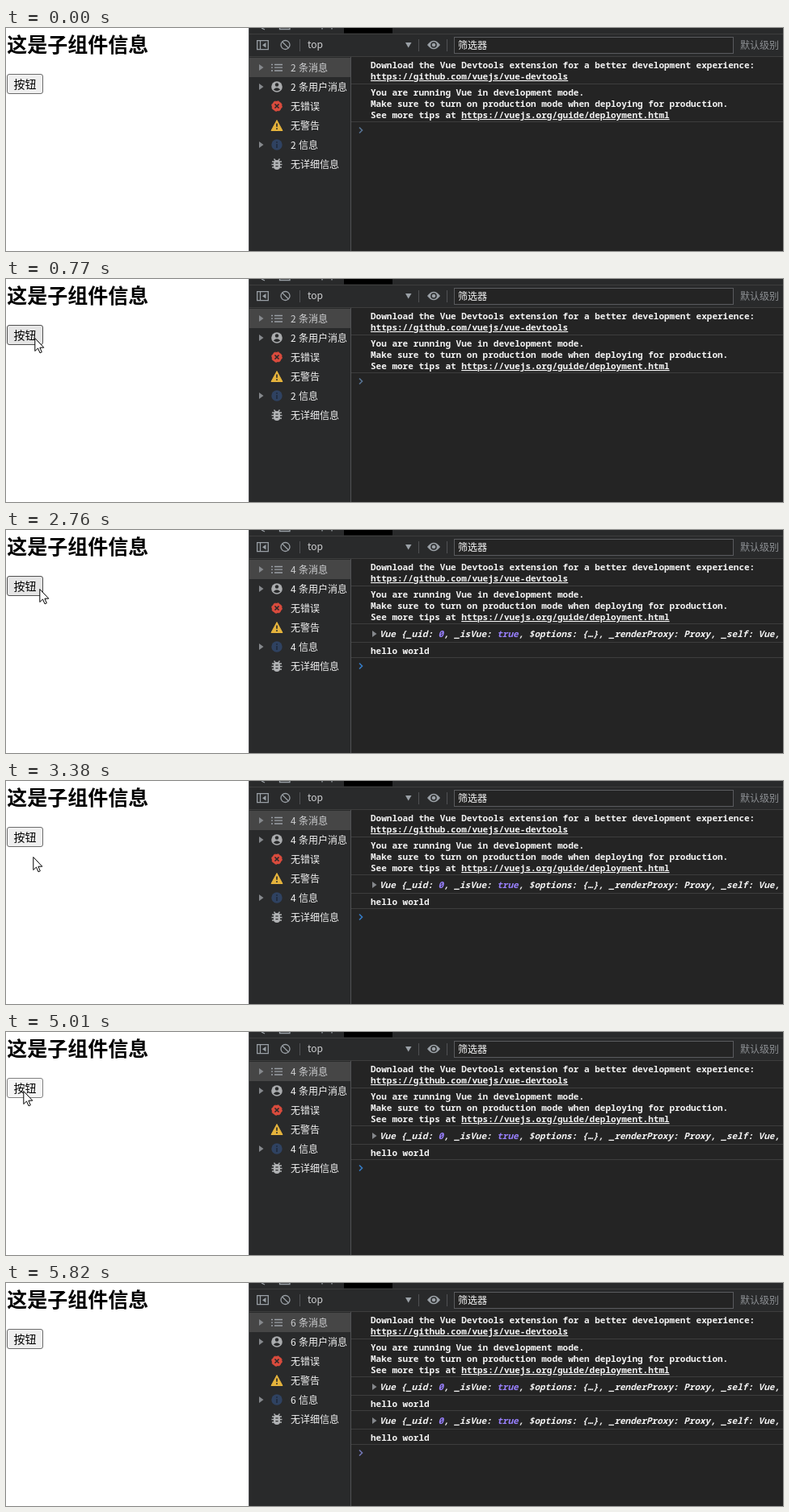
An HTML page that plays this animation: 961x277 px, repeating every 6.55 s.

```html
<!DOCTYPE html>
<html lang="zh-CN">
<head>
<meta charset="utf-8">
<title>子组件信息</title>
<style>
html, body { margin: 0; width: 100%; height: 100%; overflow: hidden; background: #fff; }
svg { display: block; width: 100vw; height: 100vh; }
text { font: 500 12px "Noto Sans CJK SC", "Noto Sans CJK", sans-serif; fill: #f4f4f4; }
.title { font-size: 25px; font-weight: 700; fill: #000; }
.label { font-size: 14px; font-weight: 400; fill: #000; }
.dim { fill: #cfd0d2; }
.faint { fill: #8d9094; font-weight: 400; }
.mono { font: 600 11px "Noto Sans Mono", "Liberation Mono", monospace; }
.object { font-style: italic; }
.link { text-decoration: underline; }
.value { fill: #9980ff; }
.rule { stroke: #3d3d3d; }
.edge { stroke: #505154; }
.line { fill: none; stroke: #9aa0a6; stroke-width: 1.3; }
.gray { fill: #9aa0a6; }
.dark { fill: #292a2b; }
.arrow { fill: #85888c; }

/* One 6550 ms clock; every change is a hard step. */
.anim { animation: 6550ms step-end infinite; }
.cursor { animation-name: cursor; }
.button { animation-name: button; }
.prompt { animation-name: prompt; fill: none; stroke-width: 1.6; }
.idle { animation-name: idle; }
.once { animation-name: once; }
.first { animation-name: first; }
.second { animation-name: second; }

@keyframes cursor {
  0% { transform: translate(970px, 277px); }
  3.04% { transform: translate(564px, 249px); }
  4.11% { transform: translate(310px, 152px); }
  5.18% { transform: translate(152px, 97px); }
  6.25% { transform: translate(91px, 80px); }
  7.32% { transform: translate(73px, 78px); }
  8.39% { transform: translate(59px, 76px); }
  9.46% { transform: translate(49px, 75px); }
  10.52% { transform: translate(40px, 74px); }
  11.75% { transform: translate(36px, 73px); }
  42.13% { transform: translate(42px, 73px); }
  43.2% { transform: translate(66px, 80px); }
  44.27% { transform: translate(112px, 89px); }
  45.34% { transform: translate(160px, 93px); }
  46.41% { transform: translate(184px, 94px); }
  47.48% { transform: translate(168px, 94px); }
  48.54% { transform: translate(112px, 94px); }
  50.53% { transform: translate(55px, 94px); }
  51.6% { transform: translate(34px, 94px); }
  52.67% { transform: translate(24px, 90px); }
  53.73% { transform: translate(15px, 83px); }
  54.8% { transform: translate(16px, 78px); }
  55.87% { transform: translate(19px, 75px); }
  56.94% { transform: translate(21px, 74px); }
  58.01% { transform: translate(22px, 73px); }
  86.71% { transform: translate(120px, 104px); }
  87.78% { transform: translate(674px, 249px); }
  88.85%, 100% { transform: translate(970px, 277px); }
}
@keyframes button {
  0%, 43.2%, 86.71%, 100% { fill: #efefef; stroke: #6b6b6b; }
  10.52%, 15.87%, 54.8%, 77.55% { fill: #e5e5e5; stroke: #4f4f4f; }
  14.8%, 76.48% { fill: #f5f5f5; stroke: #808080; }
}
@keyframes prompt {
  0% { transform: none; stroke: #587594; }
  15.87% { transform: translateY(42px); stroke: #367cc5; }
  77.55%, 100% { transform: translateY(84px); stroke: #7377b5; }
}
@keyframes idle { 0% { opacity: 1; } 15.87%, 100% { opacity: 0; } }
@keyframes once { 0%, 77.55%, 100% { opacity: 0; } 15.87% { opacity: 1; } }
@keyframes first { 0% { opacity: 0; } 15.87%, 100% { opacity: 1; } }
@keyframes second { 0% { opacity: 0; } 77.55%, 100% { opacity: 1; } }
</style>
</head>
<body>
<svg viewBox="0 0 961 277" preserveAspectRatio="none">
  <defs>
    <path id="tri" class="arrow" d="M0-4 5.5 0 0 4Z"/>
    <g id="entry" lang="en">
      <use href="#tri" x="453" y="129"/>
      <text class="mono object" x="462" y="133">Vue {_uid: <tspan class="value">0</tspan>, _isVue: <tspan class="value">true</tspan>, $options: {…}, _renderProxy: Proxy, _self: Vue,</text>
      <path class="rule" d="M427 139.5H961M427 158.5H961"/>
      <text class="mono" x="451" y="154">hello world</text>
    </g>
  </defs>

  <!-- Page -->
  <rect width="961" height="277" fill="#fff"/>
  <text class="title" x="1.3" y="29.5">这是子组件信息</text>
  <rect class="anim button" x="1.5" y="57.5" width="44" height="24" rx="2.5"/>
  <text class="label" x="9.5" y="75.3">按钮</text>

  <!-- Panel -->
  <rect class="dark" x="300" width="661" height="277"/>
  <rect x="427" y="36" width="534" height="241" fill="#242424"/>
  <rect x="418" width="60" height="6.5" fill="#000"/>
  <path class="line" d="M316 0l4 2M338.5 0V1.5H351V0M391 0v1.5M403 0v1.5"/>
  <path class="rule" d="M300 7.5H961M300 35.5H961"/>
  <path class="edge" d="M300.5 0V277M426.5 36V277M363.5 14V29M510.5 14V29M545.5 14V29"/>

  <!-- Toolbar -->
  <path class="line" d="M310.7 15.7H324.3V26.7H310.7ZM314.5 16V26.5"/>
  <path class="gray" d="M321.5 18V24.5L317 21.2Z"/>
  <circle class="line" cx="345.5" cy="21" r="5.5"/>
  <path class="line" d="M341.5 17 349.5 25"/>
  <text x="373" y="25" class="dim">top</text>
  <path class="gray" d="M494 18H501.5L497.7 24.5Z"/>
  <path class="gray" d="M521 21Q529 10.5 537 21 529 31.5 521 21Z"/>
  <circle class="dark" cx="529" cy="21" r="3.8"/>
  <circle class="gray" cx="529" cy="21" r="2.3"/>
  <rect x="554.5" y="11.5" width="345" height="20" fill="#242424" stroke="#5a5b5e"/>
  <text x="559" y="25.7">筛选器</text>
  <text x="908" y="25.7" class="faint">默认级别</text>

  <!-- Sidebar -->
  <rect x="301" y="37" width="125" height="24" fill="#464646"/>
  <use href="#tri" x="313" y="49"/>
  <use href="#tri" x="313" y="73"/>
  <use href="#tri" x="313" y="145"/>
  <path class="line" d="M328 45.5h2M332 45.5h10M328 49.2h2M332 49.2h10M328 53h2M332 53h10"/>
  <circle cx="335" cy="73" r="6.8" fill="#aaacae"/>
  <circle class="dark" cx="335" cy="70.5" r="2.2"/>
  <path class="dark" d="M330.8 76.6Q335 72 339.2 76.6 335 80 330.8 76.6Z"/>
  <circle cx="335" cy="97" r="6.3" fill="#d94b3d" stroke="#d94b3d" stroke-dasharray="2.5 2.45"/>
  <path d="M332.5 94.5l5 5m0-5l-5 5" stroke="#292a2b" stroke-width="1.6"/>
  <path d="M335 114.5 342 127.5H328Z" fill="#e5b33c" stroke="#e5b33c" stroke-linejoin="round"/>
  <path d="M335 118.5v4.3m0 1.4v1.8" stroke="#292a2b" stroke-width="1.6"/>
  <circle cx="335" cy="145" r="6.7" fill="#2f4261"/>
  <path d="M335 141v1.7m0 1.4v4.8" stroke="#202a3b" stroke-width="1.6"/>
  <path d="M329 166h12M328.5 169.5h13M329 173h12M331.5 162.5l2 2.5M338.5 162.5l-2 2.5" stroke="#b0b2b4" stroke-width="1.4"/>
  <rect x="331" y="164" width="8" height="12" rx="4" fill="#b0b2b4"/>
  <path class="dark" d="M333.5 167.3h3v1.3h-3zM333.5 171h3v1.3h-3z"/>
  <text class="anim idle" x="352 352 352" y="53.5 77.5 149.5"><tspan class="dim">2</tspan>22</text>
  <text class="anim once" x="352 352 352" y="53.5 77.5 149.5"><tspan class="dim">4</tspan>44</text>
  <text class="anim second" x="352 352 352" y="53.5 77.5 149.5"><tspan class="dim">6</tspan>66</text>
  <text class="dim" x="362" y="53.5">条消息</text>
  <text x="362" y="77.5">条用户消息</text>
  <text x="352" y="101.5">无错误</text>
  <text x="352" y="125.5">无警告</text>
  <text x="362" y="149.5">信息</text>
  <text x="352" y="173.5">无详细信息</text>

  <!-- Console -->
  <text class="mono" x="451" y="50">Download the Vue Devtools extension for a better development experience:</text>
  <text class="mono link" x="451" y="64">https://github.com/vuejs/vue-devtools</text>
  <path class="rule" d="M427 69.5H961M427 116.5H961"/>
  <text class="mono" x="451" y="84">You are running Vue in development mode.</text>
  <text class="mono" x="451" y="98">Make sure to turn on production mode when deploying for production.</text>
  <text class="mono" x="451" y="112">See more tips at <tspan class="link">https://vuejs.org/guide/deployment.html</tspan></text>
  <use class="anim first" href="#entry"/>
  <use class="anim second" href="#entry" y="42"/>
  <path class="anim prompt" d="M437 123.5 440.5 127 437 130.5"/>

  <path class="anim cursor" d="M-.2.5V16.5L3.5 13 6 18.8 8.3 17.8 5.9 12.2H10.8Z" fill="#fff" stroke="#000"/>
</svg>
</body>
</html>
```
